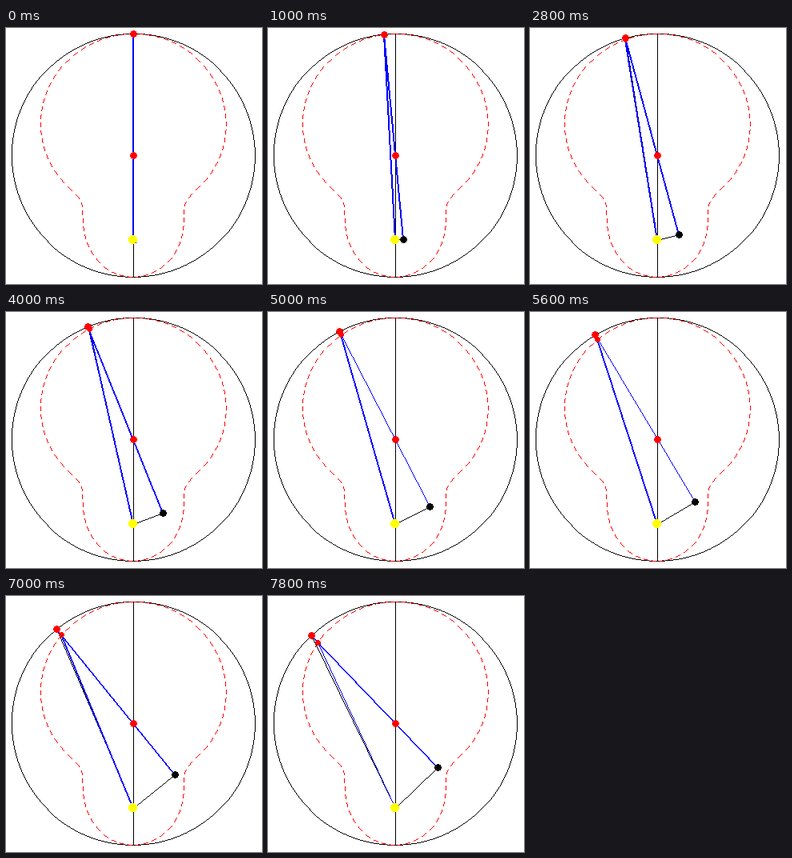
These frames come from a looping animation (320x320 px, 8 s). A matplotlib script:

```python
import numpy as np
import matplotlib.pyplot as plt
from matplotlib.animation import FuncAnimation

SIZE, DPI = 320, 100
R = 152
ECC = 0.7
FRAMES, INTERVAL = 40, 200
MEAN_STEP = 2 * np.pi / 196

WHITE, BLACK = (255, 255, 255), (0, 0, 0)
RED, BLUE, YELLOW = (255, 0, 0), (0, 0, 255), (255, 255, 0)

center = np.array([158.85, 158.85])
sun = center + [0, ECC * R]
rows, cols = np.mgrid[:SIZE, :SIZE]


def ray(angle, dist):
    """Point at a distance from the center, angle measured from the top."""
    return center + np.stack([-dist * np.sin(angle), -dist * np.cos(angle)], axis=-1)


def orbit_radius(angle):
    """Radius on the ray for which the sun distance is R(1 + e cos)."""
    c, s = ECC * np.cos(angle), ECC * np.sin(angle)
    return R * (np.sqrt((1 + c) ** 2 - s ** 2) - c)


def eccentric_angle(mean):
    """Solve mean = b + e sin b by Newton iteration."""
    b = mean / (1 + ECC)
    for _ in range(8):
        b -= (b + ECC * np.sin(b) - mean) / (1 + ECC * np.cos(b))
    return b


def snap(point):
    return np.rint(point).astype(int)


def trace(points):
    """Pixels along a densely sampled curve, without staircase corners."""
    path = []
    for p in snap(points):
        if path and np.array_equal(p, path[-1]):
            continue
        if len(path) > 1 and np.abs(p - path[-2]).max() <= 1:
            path.pop()
        path.append(p)
    return np.array(path)


def plot(img, pixels, color):
    img[pixels[:, 1], pixels[:, 0]] = color


def line(img, a, b, color, width=1):
    a, b = snap(a), snap(b)
    n = np.abs(b - a).max()
    pixels = snap(np.linspace(a, b, n + 1))
    for k in range(width):
        plot(img, pixels - [k, 0], color)


def bar(img, a, b):
    """Blue bar, two pixels wide except at medium slopes."""
    dx, dy = np.abs(a - b)
    thin = 23 < np.degrees(np.arctan2(dx, dy)) < 38
    line(img, a, b, BLUE, 1 if thin else 2)


def dot(img, pos, radius, color):
    x, y = snap(pos)
    img[(cols - x) ** 2 + (rows - y) ** 2 <= radius ** 2] = color


def backdrop():
    img = np.full((SIZE, SIZE, 3), WHITE, dtype=np.uint8)
    turn = np.linspace(0, 2 * np.pi, 8001)
    plot(img, trace(ray(turn, np.full_like(turn, R))), BLACK)
    orbit = trace(ray(turn, orbit_radius(turn)))
    plot(img, orbit[np.arange(len(orbit)) % 10 < 6], RED)
    line(img, center - [0, R], center + [0, R], BLACK)
    return img


base = backdrop()
fig = plt.figure(figsize=(SIZE / DPI, SIZE / DPI), dpi=DPI, facecolor="white")
ax = fig.add_axes([0, 0, 1, 1])
ax.axis("off")
view = ax.imshow(base, interpolation="none", aspect="auto")


def update(i):
    angle = eccentric_angle(MEAN_STEP * i)
    rim = ray(angle, R)
    planet = ray(angle, orbit_radius(angle))
    foot = ray(angle, -ECC * R * np.cos(angle))

    img = base.copy()
    line(img, sun, rim, BLACK)
    line(img, sun, foot, BLACK)
    bar(img, sun, planet)
    bar(img, foot, rim)
    dot(img, foot, 4.3, BLACK)
    dot(img, rim, 4.3, RED)
    dot(img, planet, 3.3, RED)
    dot(img, center, 4.3, RED)
    dot(img, sun - [1, 1], 5.4, YELLOW)
    view.set_data(img)
    return (view,)


anim = FuncAnimation(fig, update, frames=FRAMES, interval=INTERVAL,
                     repeat=True, repeat_delay=0, blit=False)
plt.show()
```
